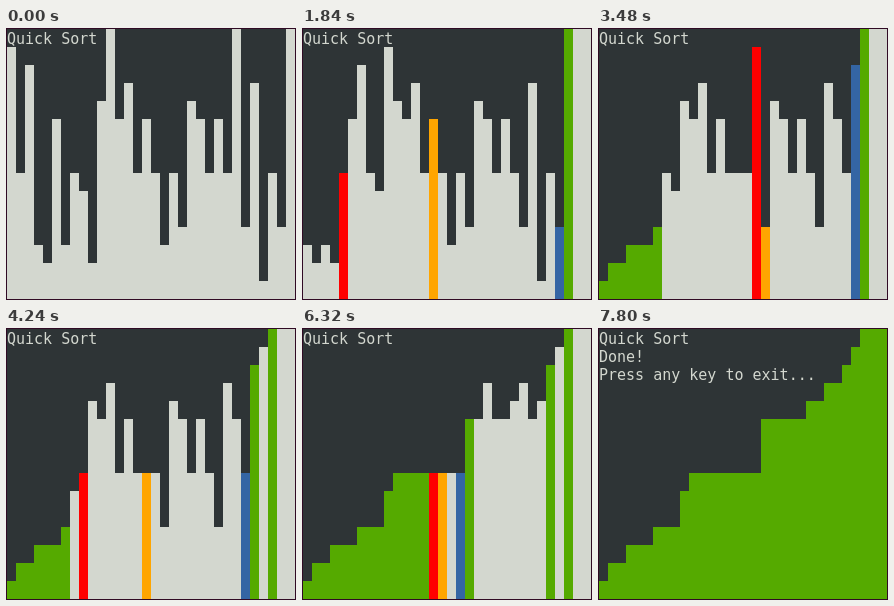
An HTML page with a canvas for the animation above (7.84 s loop, 290 by 272 pixels).

```html
<!DOCTYPE html>
<html lang="en">
<head>
<meta charset="utf-8">
<title>Quick Sort</title>
<style>
  html, body { margin: 0; width: 100%; height: 100%; overflow: hidden; background: #300a24; }
  canvas { display: block; }
</style>
</head>
<body>
<canvas id="stage" width="290" height="272"></canvas>
<script>
const ctx = document.getElementById('stage').getContext('2d');
const CELL_W = 9, CELL_H = 18, ROWS = 15;
const STEP = 40, LOOP = 7840;
const GREY = '#d3d7cf', RED = '#ff0000', ORANGE = '#ffa500', BLUE = '#3465a4', GREEN = '#55aa00';

const values = [14, 7, 13, 3, 2, 10, 3, 7, 6, 2, 11, 15, 10, 12, 7, 10,
                7, 3, 7, 4, 11, 10, 7, 10, 7, 15, 4, 12, 1, 7, 4, 15];
const settled = new Set();
const states = [];

// Record the bars with the store index, scan index and pivot index.
function record(store = -1, scan = -1, pivot = -1) {
  states.push(values.map((height, k) => ({
    height,
    color: k === store ? RED : k === scan ? ORANGE : k === pivot ? BLUE
      : settled.has(k) ? GREEN : GREY
  })));
}

function swap(a, b) {
  [values[a], values[b]] = [values[b], values[a]];
}

function quickSort(lo, hi) {
  if (lo > hi) return;
  if (lo === hi) {
    settled.add(lo);
    return;
  }
  let store = lo;
  for (let scan = lo; scan < hi; scan++) {
    record(store, scan, hi);
    if (values[scan] < values[hi]) swap(store++, scan);
  }
  swap(store, hi);
  settled.add(store);
  record();
  quickSort(lo, store - 1);
  quickSort(store + 1, hi);
}

quickSort(0, values.length - 1);
states[0].forEach(bar => bar.color = GREY); // opens without highlights
record();

function draw(now) {
  const last = states.length - 1;
  const step = Math.min(Math.floor(now % LOOP / STEP), last);
  ctx.fillStyle = '#300a24';
  ctx.fillRect(0, 0, 290, 272);
  ctx.fillStyle = '#2e3436';
  ctx.fillRect(1, 1, 288, 270);

  states[step].forEach(({ height, color }, k) => {
    ctx.fillStyle = color;
    ctx.fillRect(1 + k * CELL_W, 1 + (ROWS - height) * CELL_H, CELL_W, height * CELL_H);
  });

  const lines = ['Quick Sort'];
  if (step === last) lines.push('Done!', 'Press any key to exit...');
  ctx.font = '15px "DejaVu Sans Mono", monospace';
  ctx.fillStyle = GREY;
  lines.forEach((line, row) => ctx.fillText(line, 1, 16 + row * CELL_H));
}

const start = performance.now();
function tick() {
  draw(performance.now() - start);
  requestAnimationFrame(tick);
}
tick();
</script>
</body>
</html>
```
